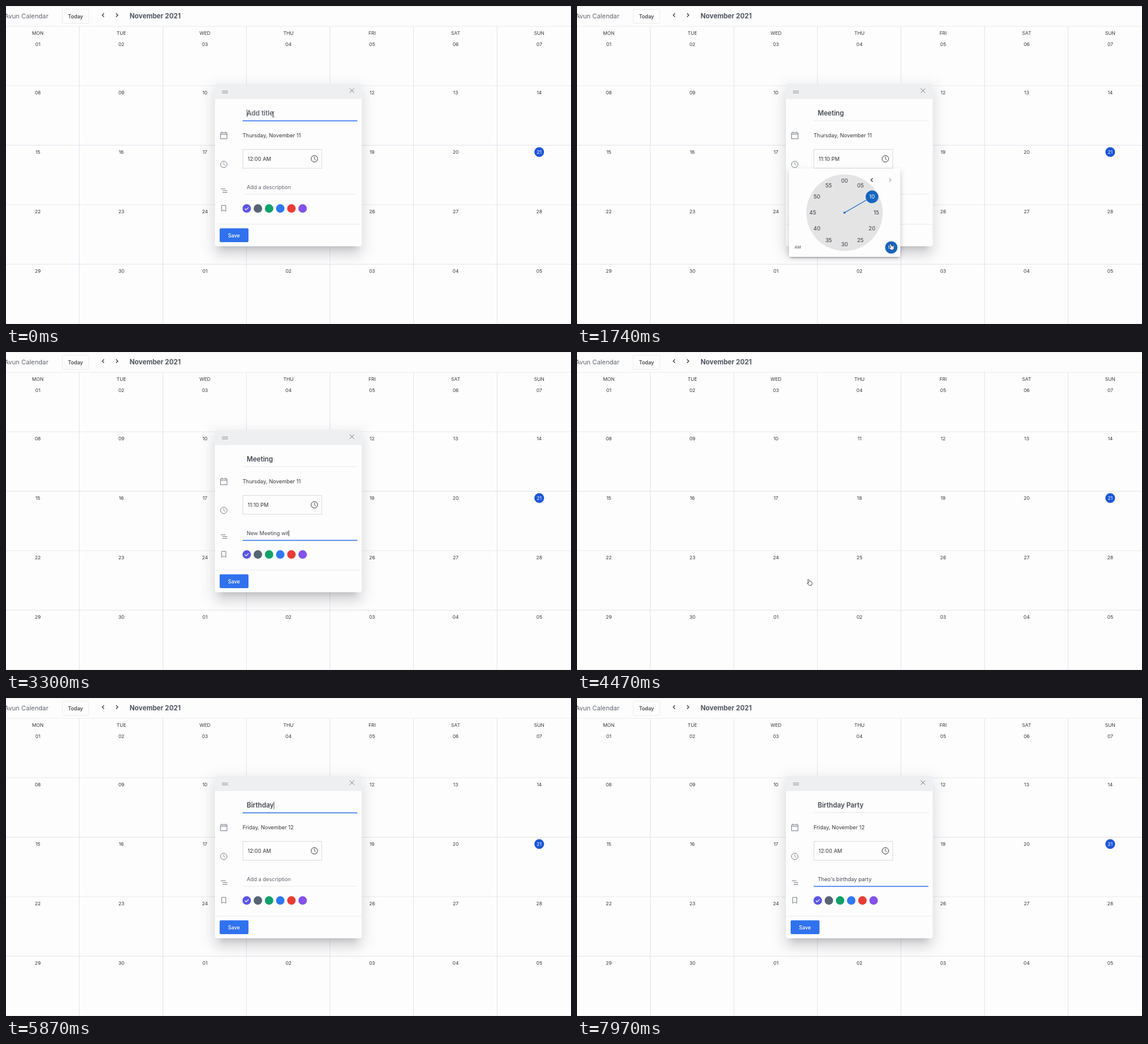
Write an HTML page that moves like this. It is 960 px wide and 540 px high and loops after 8000 ms.

```html
<!DOCTYPE html>
<html lang="en">
<head>
<meta charset="utf-8">
<title>Calendar</title>
<style>
  html, body { margin: 0; width: 100%; height: 100%; overflow: hidden; background: #fdfdfd; }
  svg { display: block; width: 100vw; height: 100vh; }
  text { font-family: Inter, "Open Sans", sans-serif; white-space: pre; }
</style>
</head>
<body>
<svg id="stage" viewBox="0 0 960 540"></svg>
<script>
const LOOP = 8000;
const INK = '#34363c', SOFT = '#62666f', PAPER = '#fdfdfd', BLUE = '#1565c0';
const RULE = '#e3e3ee', PALE = '#ececea';

const stage = document.getElementById('stage');

function add(parent, tag, attrs, content) {
  const node = document.createElementNS('http://www.w3.org/2000/svg', tag);
  for (const key in attrs) node.setAttribute(key, attrs[key]);
  if (content !== undefined) node.textContent = content;
  parent.appendChild(node);
  return node;
}
const group = (parent) => add(parent, 'g', {});
const rect = (parent, x, y, width, height, fill, extra) =>
  add(parent, 'rect', { x, y, width, height, fill, ...extra });
const circle = (parent, cx, cy, r, fill, extra) => add(parent, 'circle', { cx, cy, r, fill, ...extra });
const stroke = (parent, d, color, width = 1, extra) =>
  add(parent, 'path', { d, fill: 'none', stroke: color, 'stroke-width': width, ...extra });

// Text is placed by the middle of its capital letters.
function label(parent, content, x, middle, size, extra) {
  return add(parent, 'text', { x, y: middle + size * 0.364, 'font-size': size, fill: INK, ...extra }, content);
}
const centred = { 'text-anchor': 'middle' };
const shadow = (parent, x, y, w, h, blur, opacity) =>
  rect(parent, x, y, w, h, '#3c3e48', { rx: 4, opacity, style: `filter: blur(${blur}px)` });
const show = (node, visible) => node.setAttribute('visibility', visible ? 'inherit' : 'hidden');
const pad = (n) => String(n).padStart(2, '0');
const clamp = (n, low, high) => Math.min(high, Math.max(low, n));
const latest = (steps, t) => steps.filter((step) => step[0] <= t).pop();

function drawCalendar() {
  const page = group(stage);
  rect(page, 0, 0, 960, 540, PAPER);
  for (const y of [0.5, 34.5, 135.5, 236.5, 337.5, 438.5, 539.5]) {
    stroke(page, `M0 ${y}H960`, y === 236.5 || y === 438.5 ? RULE : PALE);
  }
  for (let x = 124.5; x < 960; x += 142) stroke(page, `M${x} 35V540`, RULE);

  label(page, 'Avun Calendar', 72, 17, 10.8, { 'text-anchor': 'end', fill: SOFT });
  rect(page, 95.5, 5.5, 45, 24, 'none', { stroke: PALE, rx: 1 });
  label(page, 'Today', 118, 17.3, 8.8, { ...centred, 'font-weight': 500 });
  stroke(page, 'M166.5 12.5L163.5 15.5L166.5 18.5M187 12.5L190 15.5L187 18.5', INK, 1.2);
  label(page, 'November 2021', 210, 17, 11.3, { fill: '#50555f', 'font-weight': 700 });

  ['MON', 'TUE', 'WED', 'THU', 'FRI', 'SAT', 'SUN'].forEach((day, col) => {
    const x = 54 + col * 142;
    label(page, day, x, 46, 8.1, centred);
    for (let row = 0; row < 5; row++) {
      const y = row ? 46 + row * 101 : 65;
      const date = (row * 7 + col) % 30 + 1;
      const today = date === 21;
      if (today) circle(page, x, y, 8.3, '#1c56d8');
      label(page, pad(date), x, y, 8.2, { ...centred, fill: today ? '#fff' : INK });
    }
  });
}

function drawClockIcon(parent, x, y, color) {
  circle(parent, x, y, 5.5, 'none', { stroke: color, 'stroke-width': 1 });
  stroke(parent, `M${x} ${y - 3.5}V${y}L${x + 2.5} ${y + 2}`, color, 0.9);
}

function makeField(parent, y, underline, size, weight, placeholder) {
  const line = rect(parent, 402, underline, 195, 1, PALE);
  const text = label(parent, '', 409, y, size, { 'font-weight': weight });
  const caret = rect(parent, 409, y - size * 0.55, 0.8, size * 1.15, INK);
  return (entry, t) => {
    const count = clamp(Math.floor((t - entry.start) / entry.step) + 1, 0, entry.text.length);
    const value = entry.text.slice(0, count);
    const idle = t - entry.start - entry.step * entry.text.length;
    const focused = t >= entry.focus && t < entry.blur;
    text.textContent = value || placeholder;
    text.setAttribute('fill', value ? '#434750' : SOFT);
    line.setAttribute('height', focused ? 1.6 : 1);
    line.setAttribute('fill', focused ? '#3d7cf0' : PALE);
    caret.setAttribute('x', 409 + (value ? text.getComputedTextLength() : 0));
    show(caret, focused && (idle < 50 || Math.floor((idle - 50) / 500) % 2 === 1));
  };
}

function makeDialog() {
  const root = group(stage);
  shadow(root, 349, 134, 261, 288, 12, 0.1);
  shadow(root, 358, 150, 243, 272, 9, 0.12);
  shadow(root, 364, 160, 231, 252, 4, 0.15);
  rect(root, 355, 132, 249.5, 276, PAPER, { rx: 4 });
  add(root, 'path', { d: 'M355 158V136Q355 132 359 132H600.5Q604.5 132 604.5 136V158Z', fill: '#eeeff1' });
  stroke(root, 'M367 144.5H377M367 147.5H377', '#85888f');
  stroke(root, 'M584 140L591.5 147.5M591.5 140L584 147.5', '#777b84');

  const title = makeField(root, 182, 194.2, 11.25, 600, 'Add title');
  const date = label(root, '', 402, 219.7, 9);
  rect(root, 402.5, 243.5, 134, 32, 'none', { stroke: '#dcdce2' });
  const time = label(root, '', 410.5, 259.5, 9);
  drawClockIcon(root, 524, 259.5, INK);
  const description = makeField(root, 307.5, 319, 9, 400, 'Add a description');

  const icon = '#7c808c';
  stroke(root, 'M364.5 215.5H375.5V225.5H364.5ZM364.5 218H375.5M367 213V215.5M373 213V215.5', icon);
  drawClockIcon(root, 370, 269, icon);
  stroke(root, 'M365 310.5H373M368 313.5H376M368 316.5H376', icon);
  stroke(root, 'M366.5 338.5H373.5V348.5L370 346.5L366.5 348.5Z', icon);

  ['#5a55e6', '#566474', '#10a16a', '#2f78f2', '#e83c35', '#8352ea'].forEach((color, i) => {
    circle(root, 409 + i * 19, 343.8, 7.2, color);
  });
  stroke(root, 'M405.8 344L408 346.2L412.3 341.8', '#fff', 1.1);
  stroke(root, 'M355 370.5H604.5', PALE);
  rect(root, 363, 377.5, 49, 23.5, '#3072ee', { rx: 2 });
  label(root, 'Save', 387.3, 389.7, 8.7, { ...centred, fill: '#fff', 'font-weight': 500 });

  const sessions = [
    {
      open: 0, close: 4370, date: 'Thursday, November 11',
      title: { text: 'Meeting', focus: 0, start: 100, step: 72, blur: 860 },
      description: { text: 'New Meeting with team', focus: 1950, start: 2190, step: 77, blur: 4330 }
    },
    {
      open: 5010, close: LOOP, date: 'Friday, November 12',
      title: { text: 'Birthday Party', focus: 5010, start: 5310, step: 74, blur: 6480 },
      description: { text: 'Theo\'s birthday party', focus: 6480, start: 6590, step: 61, blur: LOOP }
    }
  ];
  const times = [
    [0, '12:00 AM'], [1200, '11:00 AM'], [1450, '11:10 AM'], [1700, '11:10 PM'], [5010, '12:00 AM']
  ];

  return (t) => {
    const session = sessions.find((s) => t >= s.open && t < s.close);
    show(root, session);
    if (!session) {
      root.setAttribute('display', 'none');
      return;
    }
    root.removeAttribute('display');
    date.textContent = session.date;
    time.textContent = latest(times, t)[1];
    title(session.title, t);
    description(session.description, t);
  };
}

function makePicker() {
  const root = group(stage);
  const cx = 454.5, cy = 351;
  shadow(root, 359, 279, 191.5, 148, 4, 0.2);
  shadow(root, 361, 284, 187.5, 143.5, 1.8, 0.4);
  rect(root, 360, 276, 189.5, 150, PAPER, { rx: 2 });
  circle(root, cx, cy, 65, '#e4e4e5');
  const back = stroke(root, 'M502.5 292.5L499.5 295.5L502.5 298.5', INK, 1.2);
  const next = stroke(root, 'M530.5 292.5L533.5 295.5L530.5 298.5', INK, 1.2);

  const hand = group(root);
  stroke(hand, `M${cx} ${cy}V${cy - 43}`, BLUE, 1.1);
  circle(hand, cx, cy - 54, 10.8, BLUE);
  circle(root, cx, cy, 1.8, BLUE);
  const marks = Array.from({ length: 12 }, (_, i) => {
    const angle = i * Math.PI / 6;
    return label(root, '', cx + 54 * Math.sin(angle), cy - 54 * Math.cos(angle), 9.2, centred);
  });

  const halves = [[375, 'AM'], [534, 'PM']].map(([x, name]) => ({
    disc: circle(root, x, 410, 10.5, BLUE),
    text: label(root, name, x, 410, 6.7, { ...centred, 'font-weight': 500 })
  }));

  const steps = [[0, 'hours', 0], [1200, 'hours', 11], [1290, 'minutes', 0], [1450, 'minutes', 2]];

  return (t) => {
    const open = t >= 870 && t < 1900;
    show(root, open);
    if (!open) return;
    const [, view, chosen] = latest(steps, t);
    const hours = view === 'hours';
    hand.setAttribute('transform', `rotate(${chosen * 30} ${cx} ${cy})`);
    marks.forEach((mark, i) => {
      mark.textContent = hours ? i || 12 : pad(i * 5);
      mark.setAttribute('fill', i === chosen ? '#fff' : INK);
    });
    back.setAttribute('opacity', hours ? 0.4 : 1);
    next.setAttribute('opacity', hours ? 1 : 0.4);
    halves.forEach(({ disc, text }, i) => {
      const active = (t >= 1700) === (i === 1);
      show(disc, active);
      text.setAttribute('fill', active ? '#fff' : SOFT);
    });
  };
}

function makeCursor() {
  const root = group(stage);
  const shapes = {
    beam: stroke(root, 'M-1.8 -4.5Q0 -4.5 0 -3.5Q0 -4.5 1.8 -4.5M0 -3.5V3.5M-1.8 4.5Q0 4.5 0 3.5Q0 4.5 1.8 4.5', INK, 0.9),
    hand: add(root, 'path', {
      d: 'M-2.6 -4.6Q-1.6 -5.6 -.8 -4.2L.3 -1.6Q1.4 -2.4 2 -1.2Q3.4 -1.6 3.6 -.2Q4.6 0 4.5 1.4L4.2 3.4L3.4 5.2H-.7L-3.8 1.9Q-4.3 .8 -3.2 .6L-1.2 1.5L-2.9 -3.4Z',
      fill: '#fff', stroke: INK, 'stroke-width': 0.9, 'stroke-linejoin': 'round'
    })
  };
  const path = [
    [0, 454, 184, 'beam'], [90, 454, 184, ''], [620, 454, 184, 'beam'], [680, 454, 184, 'hand'],
    [830, 524, 259, 'hand'], [900, 524, 259, 'hand'], [1080, 428, 306, 'hand'], [1230, 428, 306, 'hand'],
    [1400, 501, 325, 'hand'], [1500, 501, 325, 'hand'], [1660, 534, 409, 'hand'], [1750, 534, 409, 'hand'],
    [1880, 513, 299, 'beam'], [2180, 513, 299, ''], [3820, 513, 299, 'hand'], [4150, 395, 391, 'hand'],
    [4600, 395, 391, 'hand'], [4950, 622, 190, 'hand'], [5220, 622, 190, ''], [6350, 622, 190, 'hand'],
    [6450, 500, 305, 'beam'], [6580, 500, 305, ''], [LOOP, 500, 305, '']
  ];

  return (t) => {
    const i = path.findIndex((point) => point[0] > t);
    const [t0, x0, y0, shape] = path[i - 1];
    const [t1, x1, y1] = path[i];
    const p = (t - t0) / (t1 - t0);
    const eased = p * p * (3 - 2 * p);
    root.setAttribute('transform', `translate(${x0 + (x1 - x0) * eased} ${y0 + (y1 - y0) * eased})`);
    for (const name in shapes) show(shapes[name], name === shape);
  };
}

drawCalendar();
const parts = [makeDialog(), makePicker(), makeCursor()];
const began = performance.now();

function render() {
  const t = Math.max(0, performance.now() - began) % LOOP;
  for (const update of parts) update(t);
  requestAnimationFrame(render);
}
render();
</script>
</body>
</html>
```
